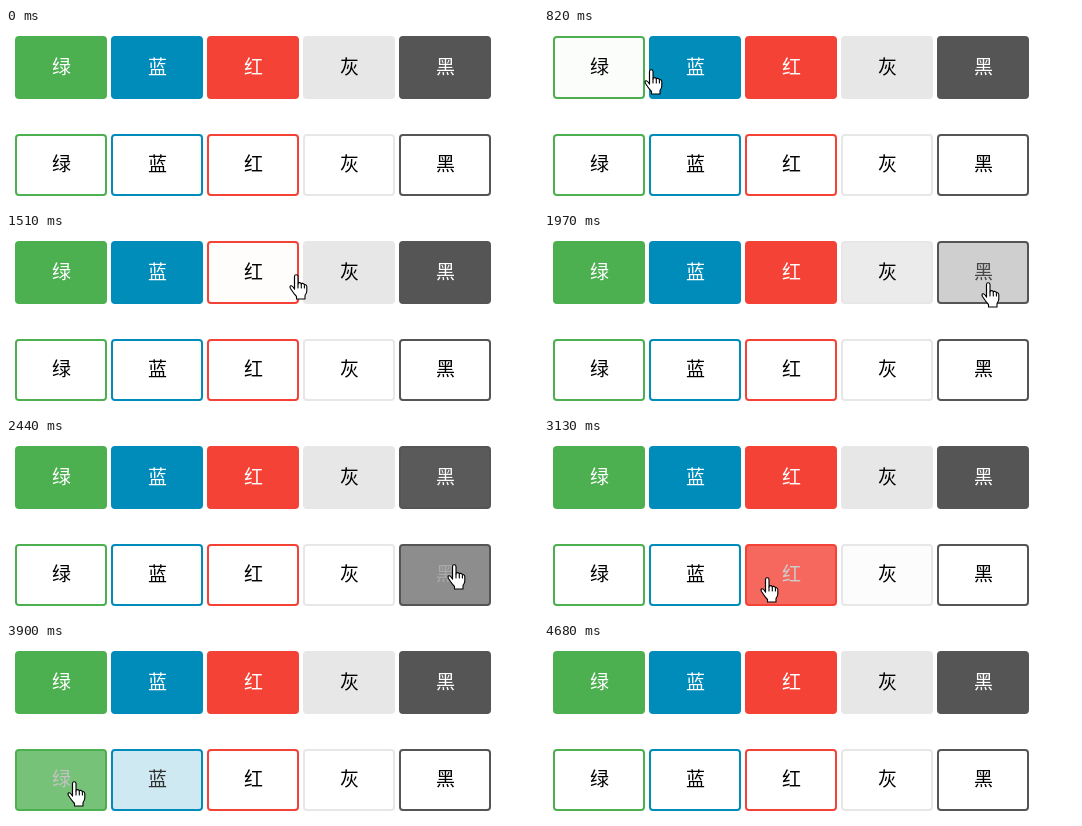
Write an HTML page that moves like this. It is 532 px wide and 177 px high and loops after 5.15 s.

```html
<!DOCTYPE html>
<html lang="zh-CN">
<head>
<meta charset="utf-8">
<title>按钮悬停效果</title>
<style>
html, body { margin: 0; width: 100%; height: 100%; overflow: hidden; background: #fff; }
svg { display: block; width: 532px; height: 177px; }
text { font: 19px "Noto Sans CJK SC", "Noto Sans CJK", sans-serif; text-anchor: middle; }
</style>
</head>
<body>
<svg id="stage" viewBox="0 0 532 177">
  <g id="buttons"></g>
  <g id="hand" stroke="#000" stroke-width="1.1" stroke-linejoin="round" stroke-linecap="round" visibility="hidden">
    <path fill="#fff" d="M.5 2.5Q.5 .8 2.2 .8T4 2.5V10Q4 8.6 5.6 8.6T7.3 10.2Q7.3 9.2 8.8 9.4T10.4 11Q10.6 10.4 11.6 10.7T12.8 12.5V17Q12.8 19 11 21.5V25H2.5V22.5Q0 20 -3.5 14.5Q-4.6 12.4 -3.2 11.8T.5 15Z"/>
    <path fill="none" d="M.5 2.5V15M4 10v4M7.3 10.5v3.5M10.4 11.5v2.5"/>
  </g>
</svg>
<script>
const LOOP = 5150, START = 200, STEP = 76.9, LAST = 58, FADE = 400;
const WHITE = [255, 255, 255], BLACK = [0, 0, 0];
const STYLES = [
  ['绿', [76, 175, 80]],
  ['蓝', [0, 140, 186]],
  ['红', [244, 67, 54]],
  ['灰', [231, 231, 231]],
  ['黑', [85, 85, 85]]
];
const ROWS = [{ y: 8, h: 63, base: 46 }, { y: 106, h: 62, base: 143 }];

// Pointer path: time, x, y
const PATH = [
  [200, 104, 150], [300, 84, 100], [350, 78, 74], [420, 74, 56], [520, 80, 44],
  [660, 92, 40], [795, 98, 41], [815, 105, 41], [1200, 209, 44], [1507, 288, 41],
  [1740, 371, 42], [1820, 400, 42], [1950, 440, 46], [2120, 454, 69], [2283, 452, 107],
  [2430, 446, 126], [2600, 395, 136], [2816, 316, 140], [2920, 293, 141], [3122, 221, 139],
  [3260, 196, 139], [3500, 150, 140], [3700, 101, 140], [3891, 66, 138], [4200, 66, 138],
  [4280, 110, 140], [4360, 250, 145], [4440, 420, 152], [4500, 465, 180]
];

const lerp = (a, b, p) => a + (b - a) * p;
const rgb = c => `rgb(${c.map(Math.round).join()})`;
const mix = (a, b, p) => rgb(a.map((v, i) => lerp(v, b[i], p)));

// CSS "ease": cubic-bezier(.25, .1, .25, 1)
function ease(x) {
  if (x >= 1) return 1;
  const curve = (a, b, s) => 3 * a * s * (1 - s) ** 2 + 3 * b * s * s * (1 - s) + s ** 3;
  let lo = 0, hi = 1;
  for (let i = 0; i < 24; i++) {
    const mid = (lo + hi) / 2;
    if (curve(.25, .25, mid) < x) lo = mid; else hi = mid;
  }
  return curve(.1, 1, lo);
}

function pointer(t) {
  const i = PATH.findIndex(p => p[0] > t);
  if (i < 1) return null;
  const a = PATH[i - 1], b = PATH[i], p = (t - a[0]) / (b[0] - a[0]);
  return { x: lerp(a[1], b[1], p), y: lerp(a[2], b[2], p) };
}

function add(parent, tag, attrs) {
  const el = document.createElementNS('http://www.w3.org/2000/svg', tag);
  for (const key in attrs) el.setAttribute(key, attrs[key]);
  return parent.appendChild(el);
}

const hand = document.getElementById('hand');
const group = document.getElementById('buttons');
const buttons = ROWS.flatMap((row, r) => STYLES.map(([label, color], i) => {
  const x = 9 + 96 * i;
  const box = add(group, 'rect', {
    x: x + 1, y: row.y + 1, width: 90, height: row.h - 2, rx: 3,
    stroke: rgb(color), 'stroke-width': 2
  });
  const text = add(group, 'text', { x: x + 46.5, y: row.base });
  text.textContent = label;
  const ink = i === 3 ? BLACK : WHITE;
  const filled = { bg: color, ink }, plain = { bg: WHITE, ink: BLACK };
  const [rest, over] = r ? [plain, filled] : [filled, plain];
  return { x, y: row.y, h: row.h, box, text, rest, over };
}));

// Hover amount of one button at every step, reversing early fades like CSS does
function hoverLevels(b) {
  const levels = [];
  let from = 0, to = 0, since = 0, now = 0;
  for (let t = START; levels.length <= LAST; t++) {
    const p = pointer(t);
    const inside = p && p.x + 1 >= b.x && p.x + 1 < b.x + 92 && p.y + 1 >= b.y && p.y + 1 < b.y + b.h;
    if (+!!inside !== to) {
      from = now;
      to = +!!inside;
      since = t;
    }
    const span = FADE * Math.abs(to - from);
    now = span ? lerp(from, to, ease((t - since) / span)) : to;
    if (t >= START + STEP * levels.length) levels.push(now);
  }
  return levels;
}
for (const b of buttons) b.levels = hoverLevels(b);

function draw(t) {
  const k = Math.min(LAST, Math.floor((t - START) / STEP));
  for (const b of buttons) {
    const p = k < 0 ? 0 : b.levels[k];
    b.box.setAttribute('fill', mix(b.rest.bg, b.over.bg, p));
    b.text.setAttribute('fill', mix(b.rest.ink, b.over.ink, p));
  }
  const pos = k < 0 ? null : pointer(START + STEP * k);
  hand.setAttribute('visibility', pos ? 'visible' : 'hidden');
  if (pos) hand.setAttribute('transform', `translate(${Math.round(pos.x)} ${Math.round(pos.y)})`);
}

const begin = performance.now();
function tick() {
  draw((performance.now() - begin) % LOOP);
  requestAnimationFrame(tick);
}
tick();
</script>
</body>
</html>
```
